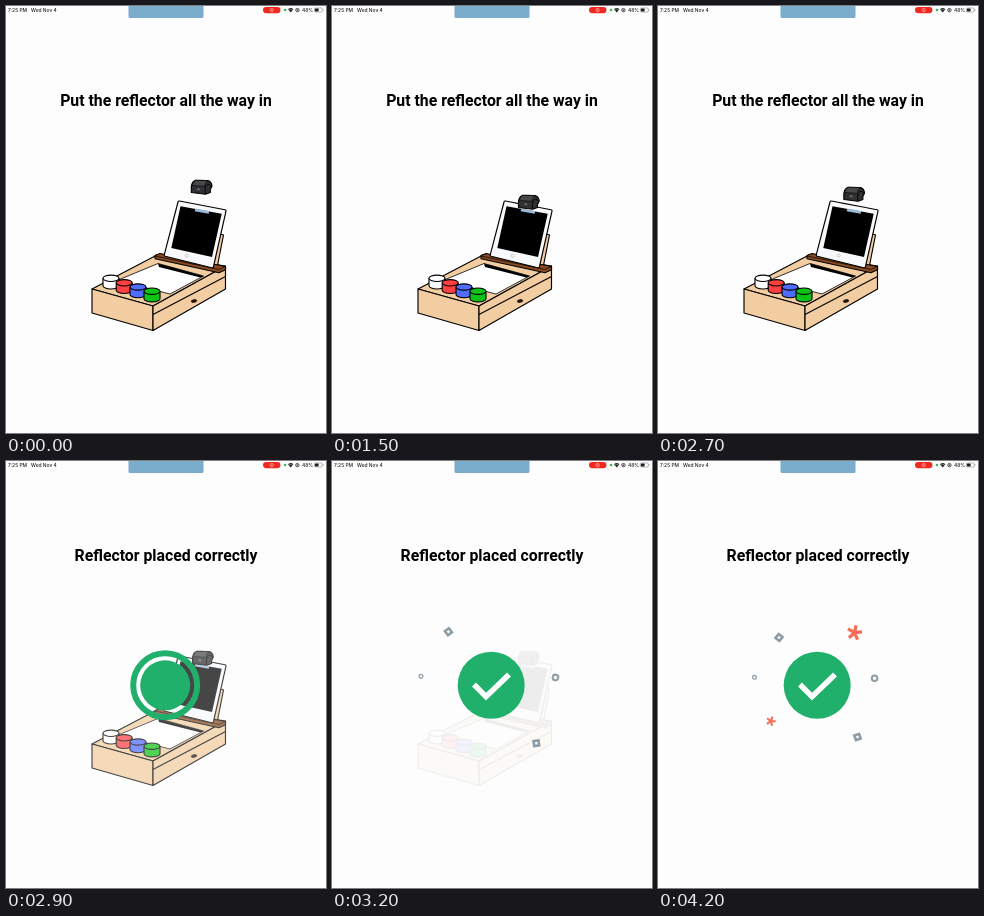
These frames come from a looping animation (320 by 427 pixels, 4.3 s). An HTML page:

```html
<!DOCTYPE html>
<html lang="en">
<head>
<meta charset="utf-8">
<title>Reflector placement</title>
<style>
  html, body { margin: 0; width: 100%; height: 100%; overflow: hidden; background: #fdfdfd; }
  svg { display: block; width: 320px; height: 427px; }
  .title { font: 700 15.8px Roboto, sans-serif; text-anchor: middle; }
  .status { font: 500 4.9px Inter, sans-serif; fill: #222; }
  .line { stroke: #000; stroke-width: 1.15; stroke-linejoin: round; }
  .wood { fill: #f2cda1; }
</style>
</head>
<body>
<svg viewBox="0 0 320 427">
  <rect width="320" height="427" fill="#fdfdfd"/>

  <g class="status">
    <text x="2" y="5.7">7:25 PM</text>
    <text x="25" y="5.7">Wed Nov 4</text>
    <text x="296" y="5.7">48%</text>
  </g>
  <rect x="122.5" y="-2" width="75" height="14" rx="1.5" fill="#7aaccb"/>
  <rect x="257" y="1" width="17.5" height="6.2" rx="3.1" fill="#f0281f"/>
  <circle cx="265.7" cy="4.1" r="1.7" fill="none" stroke="#fff" stroke-width=".6" opacity=".7"/>
  <circle cx="265.7" cy="4.1" r=".7" fill="#fff" opacity=".7"/>
  <circle cx="279" cy="4" r="1.3" fill="#35b957"/>
  <path d="M282 3.2Q284.700 .800 287.400 3.200L284.700 6.400Z" fill="#222"/>
  <path d="M282.600 4.100Q284.700 2.400 286.800 4.100" fill="none" stroke="#fdfdfd" stroke-width=".4"/>
  <circle cx="291.4" cy="4.1" r="1.7" fill="none" stroke="#222" stroke-width=".8"/>
  <rect x="290.8" y="3.5" width="1.2" height="1.2" fill="#222"/>
  <rect x="308.3" y="2" width="8" height="4" rx="1.1" fill="none" stroke="#777" stroke-width=".5"/>
  <rect x="308.9" y="2.6" width="3.7" height="2.8" rx=".6" fill="#222"/>
  <path d="M317 3.3v1.4" stroke="#777" stroke-width=".6"/>

  <text id="title" class="title" x="160" y="100"></text>

  <g id="device">
    <g class="line wood">
      <path d="M86 283L151 249 219.500 260 147 300Z"/>
      <path d="M86 283L147 300V324.500L86 307Z"/>
      <path d="M147 300L219.500 260V283L147 324.500Z"/>
      <path d="M147 308.500L219.500 270.500" fill="none"/>
      <path d="M213 227.500L217.500 229 211 262 204 261Z"/>
    </g>
    <path d="M111 274.500L152 257.500 197.500 270 164 288Z" fill="#fff" stroke="#000" stroke-width=".8"/>
    <path d="M152 257.500L197.500 270 194.500 271.600 153 261Z"/>
    <path class="line" d="M149 249.500L154 247.500 219.500 260.500V263.800L213 266.800 149 252.800Z" fill="#8a4a22"/>
    <path d="M149 250L213 263.500 219.500 260.500" fill="none" stroke="#000" stroke-width=".7"/>
    <ellipse cx="188" cy="295" rx="2.8" ry="1.4" fill="#2a1308" stroke="#000" stroke-width=".6" transform="rotate(-12 188 295)"/>
    <g id="cups" class="line"></g>
    <path class="line" d="M173.500 195L219 203.700Q220.300 204 220 205.200L207.500 260.500Q207.200 262 205.800 261.700L159.200 250.200Q158 249.800 158.300 248.600L172 196Q172.300 194.800 173.500 195Z" fill="#f7f9fb"/>
    <path d="M174.500 200.300L215.700 207.700 206 251 165.300 242Z"/>
    <path d="M189.300 202.600L203.300 205.100 202.700 207.800 188.600 205.200Z" fill="#9ab9d6"/>
    <circle cx="180.6" cy="249.700" r="1.5" fill="#fff" stroke="#999" stroke-width=".5"/>
    <g id="reflector" class="line">
      <path d="M185.300 186.500V180.500Q186 175.500 189.500 174.300L202 174.600Q205.500 175.500 206 180L204.300 183.500V186.500L199.500 188.200Z" fill="#303032"/>
      <path d="M186 179.500Q187 175.500 189.500 174.300L202 174.600Q199 176.500 198.500 180.300Z" fill="#48484b" stroke-width=".6"/>
      <path d="M199.200 187.800V183Q199.500 178.500 202.500 178.300 205 178.600 205.500 181" fill="none" stroke-width=".9"/>
      <path d="M191 184.300L192.500 182.300 194 184.300" fill="none" stroke="#aaa" stroke-width=".7"/>
    </g>
  </g>

  <g id="success" transform="translate(159.200 224.300)">
    <circle id="ring" fill="none" stroke="#21b06b"/>
    <circle id="disc" fill="#21b06b"/>
    <path id="check" d="M-17.200 -.800L-5.200 11.400 17.800 -10.800" fill="none" stroke="#fff" stroke-width="5.500"/>
    <g id="bits"></g>
  </g>
</svg>

<script>
const LOOP = 4300, STEP = 100, SWITCH = 2800;
const $ = id => document.getElementById(id);

const tracks = {
  fade:  [[2700, 1], [2800, .92], [2900, .72], [3000, .42], [3100, .18], [3200, .06], [3300, 0]],
  disc:  [[2800, 0], [2900, 25], [3000, 37], [3100, 35], [3200, 33.5]],
  ring:  [[2800, 0], [2900, 32], [3000, 49.3], [3100, 53]],
  width: [[2800, 6], [2900, 6], [3000, 4], [3100, 1.3], [3200, 0]],
  check: [[2900, 0], [3000, .55], [3100, .85], [3200, 1]],
  show:  [[2900, 0], [3000, .5], [3100, .85], [3200, 1]],
  reach: [[2900, .65], [3000, .965], [3100, 1.09], [3200, 1.12], [3400, 1.06], [3600, 1]],
  spin:  [[3200, 12], [3900, 0]],
  star:  [[3400, 0], [3700, .85], [3900, 1]]
};

function at(name, t) {
  const keys = tracks[name];
  if (t <= keys[0][0]) return keys[0][1];
  for (let i = 1; i < keys.length; i++) {
    const [t0, a] = keys[i - 1], [t1, b] = keys[i];
    if (t <= t1) return a + (b - a) * (t - t0) / (t1 - t0);
  }
  return keys[keys.length - 1][1];
}

const cup = (x, y, fill) =>
  `<path d="M${x - 8} ${y}v7.5a8 3.2 0 0 0 16 0v-7.5" fill="${fill}"/>
   <ellipse cx="${x}" cy="${y}" rx="8" ry="3.2" fill="${fill}"/>`;

$('cups').innerHTML = cup(105, 272.3, '#fff') + cup(118.2, 276.8, '#ff4040') +
  cup(132, 281, '#506cff') + cup(146, 285.2, '#0cc416');

const square = `<path d="M-3.8 -3.8H3.8V3.8H-3.8Z" fill="#8e9ca5"/>
  <path d="M-1.2 -1.2H1.2V1.2H-1.2Z" fill="#fdfdfd"/>`;
const hoop = (r, w) => `<circle r="${r}" fill="none" stroke="#8e9ca5" stroke-width="${w}"/>`;

function asterisk(r, w) {
  let d = '';
  for (let i = 0; i < 5; i++) {
    const a = (i * 72 - 78) * Math.PI / 180;
    d += `M0 0L${r * Math.cos(a)} ${r * Math.sin(a)}`;
  }
  return `<path d="${d}" stroke="#f76c57" stroke-width="${w}"/>`;
}

const bits = [
  { x: -38.2, y: -47.8, turn: 40, art: square },
  { x: 40.3, y: 51.7, turn: -20, art: square },
  { x: -62.7, y: -8, turn: 0, art: hoop(1.9, 1.2) },
  { x: 57.4, y: -7, turn: 0, art: hoop(2.8, 2) },
  { x: 37.3, y: -52.6, turn: 0, art: asterisk(7.5, 3.2), star: true },
  { x: -46.3, y: 35.9, turn: 8, art: asterisk(4.8, 2), star: true }
];
$('bits').innerHTML = bits.map(b => `<g>${b.art}</g>`).join('');
bits.forEach((b, i) => b.el = $('bits').children[i]);

function draw(t) {
  const done = t >= SWITCH;
  $('title').textContent = done ? 'Reflector placed correctly' : 'Put the reflector all the way in';

  const drop = done ? 16 : t % 2000 / 100;
  $('reflector').setAttribute('transform', `translate(${drop * .08} ${drop})`);
  $('device').setAttribute('opacity', at('fade', t));

  $('success').style.display = done ? '' : 'none';
  $('disc').setAttribute('r', at('disc', t));
  $('ring').setAttribute('r', at('ring', t));
  $('ring').setAttribute('stroke-width', at('width', t));
  $('check').setAttribute('transform', `scale(${at('check', t)})`);
  $('check').setAttribute('opacity', at('show', t));

  const reach = at('reach', t);
  for (const b of bits) {
    const k = b.star ? 1 : reach, size = b.star ? at('star', t) : 1;
    b.el.setAttribute('transform',
      `translate(${b.x * k} ${b.y * k}) rotate(${b.turn + at('spin', t)}) scale(${size})`);
    b.el.setAttribute('opacity', at('show', t));
  }
}

const start = performance.now();
function tick() {
  const t = (performance.now() - start) % LOOP;
  draw(Math.floor(t / STEP) * STEP);
  requestAnimationFrame(tick);
}
tick();
</script>
</body>
</html>
```
